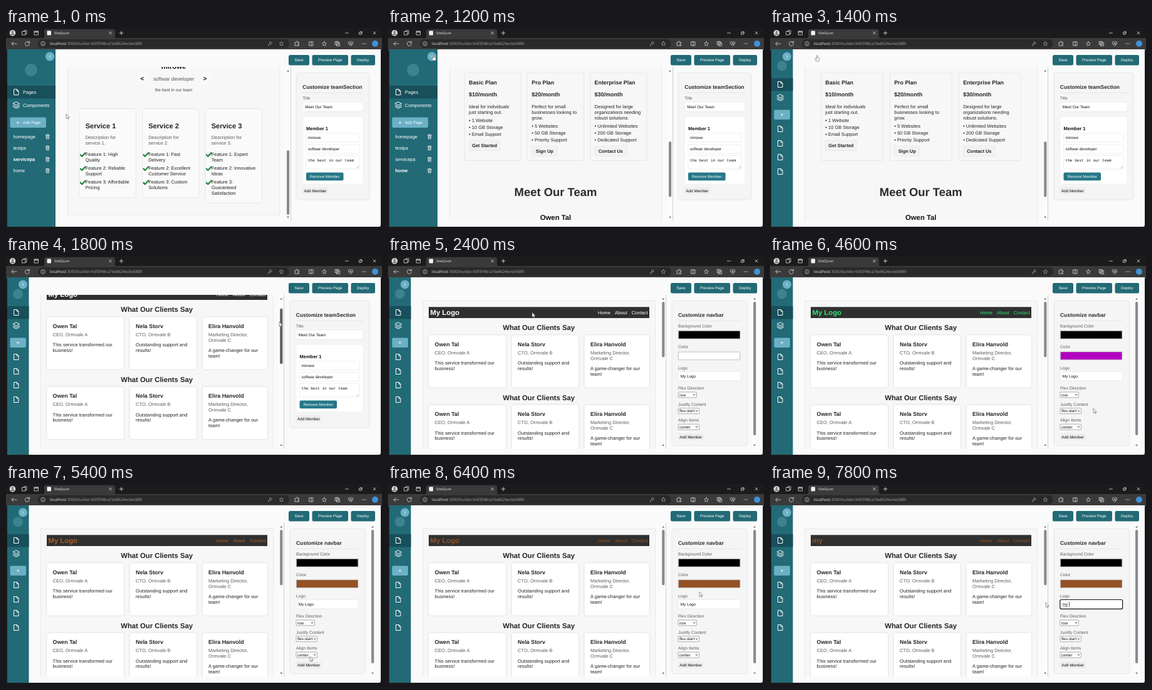
An HTML page that plays this animation: 600 px wide and 319 px high, repeating every 8 s.

```html
<!DOCTYPE html>
<html lang="en">
<head>
<meta charset="utf-8">
<title>Page builder</title>
<style>
html, body { margin: 0; width: 100%; height: 100%; overflow: hidden; background: #1b1b1b; }
svg { display: block; width: 100vw; height: 100vh; }
text { font-family: "Liberation Sans", Arial, sans-serif; white-space: pre; text-rendering: geometricPrecision; }
.ui { font-family: "Open Sans", sans-serif; }
.mono { font-family: "Liberation Mono", monospace; }
.soft { filter: drop-shadow(0 .8px 1.3px rgba(0,0,0,.18)); }
</style>
</head>
<body>
<svg id="stage" viewBox="0 0 600 319"></svg>
<script>
const LOOP = 8000, STEP = 200;
const INK = '#242424', GREY = '#5c5c5c', TEAL = '#226a76', PALE = '#6cb0c5', PAGE = '#f7f7f8';
const BOSS = 'Owen Tal', MEMBER = 'mirowe';
const stage = document.getElementById('stage');

// y is the vertical middle of the line
function text(x, y, s, size = 7.53, fill = INK, more = '') {
  const safe = s.replace(/&/g, '&amp;').replace(/</g, '&lt;');
  return `<text x="${x}" y="${y + size * 0.35}" font-size="${size}" fill="${fill}" ${more}>${safe}</text>`;
}
const bold = (x, y, s, size, fill, more = '') => text(x, y, s, size, fill, 'font-weight="700" ' + more);
const mid = 'text-anchor="middle"';
const lines = (x, y, list, gap, size, fill) => list.map((s, i) => text(x, y + i * gap, s, size, fill)).join('');
const rect = (x, y, w, h, fill, r = 0, more = '') =>
  `<rect x="${x}" y="${y}" width="${w}" height="${h}" rx="${r}" fill="${fill}" ${more}/>`;
const circle = (x, y, r, fill, more = '') => `<circle cx="${x}" cy="${y}" r="${r}" fill="${fill}" ${more}/>`;
const line = (x, y, d, color, w = 0.8) =>
  `<path transform="translate(${x} ${y})" d="${d}" fill="none" stroke="${color}" stroke-width="${w}" stroke-linecap="round" stroke-linejoin="round"/>`;
const edge = (c, w = 0.6) => `stroke="${c}" stroke-width="${w}"`;

// keys: [ms, value...], linear between them
function track(keys, t) {
  let i = 0;
  while (i < keys.length - 1 && keys[i + 1][0] <= t) i++;
  const a = keys[i], b = keys[i + 1];
  if (!b) return a.slice(1);
  const k = Math.max(0, (t - a[0]) / (b[0] - a[0]));
  return a.slice(1).map((v, j) => v + (b[j + 1] - v) * k);
}
// keys: [ms, value], held until the next one
const hold = (keys, t) => keys.filter(k => k[0] <= t).pop()[1];

const POINTER = [[0, 96, 137], [200, 84, 160], [600, 22, 225], [800, 34, 175], [1200, 73, 43], [1400, 75, 44],
  [1600, 437, 150], [1800, 436, 105], [2000, 436, 93], [2400, 230, 90], [2800, 505, 156], [3000, 500, 205],
  [3200, 528, 274], [3400, 551, 183], [3600, 545, 200], [4000, 500, 265], [4400, 524, 262], [4600, 516, 243],
  [5000, 530, 270], [5400, 485, 275], [5800, 512, 236], [6000, 515, 245], [6400, 497, 172], [6600, 488, 190],
  [7600, 488, 190], [7800, 440, 189]];
const SCROLL = [[0, 292], [1400, 292], [1600, 150], [1800, 29], [2000, 0]];
const LOGO_INK = [[0, '#ffffff'], [3000, '#d8a0a8'], [3200, '#c85060'], [3400, '#bd2a3a'], [3600, '#b300c0'],
  [4000, '#4a4fe0'], [4200, '#22b0d0'], [4400, '#22d890'], [4600, '#2ee577'], [5000, '#a5c83a'],
  [5200, '#d09a30'], [5400, '#a86028'], [5800, '#955224']];
const SWATCH = [[0, '#ffffff'], [3000, '#d8a0a8'], [3200, '#c85060'], [3400, '#b3283f'], [3600, '#b300c0'],
  [5200, '#b07830'], [5400, '#955224']];
const LOGO_TEXT = [[0, 'My Logo'], [6800, ''], [7000, 'm'], [7200, 'my']];

const FILE = 'M-3.5-4.5H.8L3.5-1.8V4.5H-3.5ZM.8-4.5V-1.8H3.5';
const LAYERS = 'M0-5L5-2.4 0 .2-5-2.4ZM-5 .2L0 2.8 5 .2M-5 2.6L0 5.2 5 2.6';
const TRASH = 'M-3-2.3H3M-1.2-2.3V-3.4H1.2V-2.3M-2.3-2.3L-2 3.4H2L2.3-2.3M-.7-.6V1.8M.7-.6V1.8';
const STAR = 'M0-3.4L1-1.1 3.4-.9 1.6.8 2.1 3.2 0 1.9-2.1 3.2-1.6.8-3.4-.9-1-1.1Z';
const CROSS = 'M-2-2L2 2M2-2L-2 2', PLUS = 'M-2.8 0H2.8M0-2.8V2.8', BOX = 'M-3-3H3V3H-3Z';

function browser() {
  const c = '#dcdcdc', dim = '#a8a8a8';
  return rect(0, 0, 600, 319, '#1b1b1b') + rect(0, 16, 600, 20, '#3a3a3a')
    + '<path d="M58 17Q61 17 61 13V5Q61 2 64 2H171Q174 2 174 5V13Q174 17 177 17Z" fill="#3a3a3a"/>'
    + circle(10.5, 8, 4.8, '#d8d8d8') + circle(10.5, 6.5, 1.7, '#777') + '<path d="M7.4 11.3a3.1 2.8 0 0 1 6.2 0Z" fill="#777"/>'
    + line(29.5, 8, 'M-3.5-2.5H1.5V3H-3.5ZM-1-2.5V-4H3.5V1.5H1.5', c) + line(48.5, 8, BOX + 'M-3-1.2H3M-3-2.2H3', c)
    + rect(65.5, 4.5, 6.5, 7, '#f1f1f1', 1) + text(77, 8, 'SiteQuon', 5.6, '#eee', 'class="ui"')
    + line(166.5, 8, CROSS, c) + line(184, 8, PLUS, c, 0.9)
    + line(544, 8, 'M-2.5 0H2.5', c) + line(566, 8, 'M-2.2-1H1V2.2H-2.2ZM-1-2.2H2.2V1', c) + line(588, 8, CROSS, c)
    + rect(51, 18, 401, 14, '#292929', 7)
    + line(13, 25, 'M4 0H-4M-1-3L-4 0-1 3', c) + line(34, 25, 'M3-1.8A3.5 3.5 0 1 0 3.5.6M3.4-4V-1.4H.8', c)
    + circle(59, 25, 3.4, 'none', edge(c, 0.7)) + line(59, 25, 'M0-.3V1.8M0-1.6V-1.5', c)
    + text(70, 25, 'localhost', 6.2, '#f0f0f0', 'class="ui"')
    + text(96, 25, ':3000/builder/66f3f48ca76e8624ec6e5889', 6.2, dim, 'class="ui"')
    + line(421, 25, 'M0 0L-3 3M-2 2L-1 3M0 0A1.8 1.8 0 1 1 2.5 .2 1.8 1.8 0 0 1 0 0', dim) + line(439.5, 25, STAR, dim, 0.7)
    + line(464.5, 25, 'M-3-2H-1A1.2 1.2 0 1 1 1-2H3V0A1.2 1.2 0 1 0 3 1.8V3.2H-3Z', c)
    + line(487, 25, BOX + 'M0-3V3', c) + line(508, 25, STAR, c, 0.7)
    + line(529, 25, 'M-3.5-3.5H1.5V1.5H-3.5ZM1.5-1.5H3.5V3.5H-1.5V1.5M-1-2.5V.5M-2.5-1H.5', c)
    + line(550, 25, 'M0 3.5L-3.4 0A2 2 0 0 1 0-2.4 2 2 0 0 1 3.4 0ZM-2 0H-.7L0-1.2.8 1.2 1.2 0H2.2', c)
    + [-2.5, 0, 2.5].map(d => circle(571 + d, 25, 0.7, c)).join('') + circle(589, 25, 5, '#3f93d6')
    + '<path d="M2 34H598V314Q598 317 595 317H5Q2 317 2 314Z" fill="#fafafb"/>';
}

function sidebar(open, home) {
  const w = open ? 77 : 34.5, white = '#fff';
  let s = `<path d="M2 34H${2 + w}V317H5Q2 317 2 314Z" fill="${TEAL}"/>`;
  if (!open) {
    s += circle(19, 60.5, 8, '#3b838f') + circle(27, 45.5, 7, PALE) + line(27, 45.5, 'M-1-2L1 0-1 2', white)
      + rect(2, 80, 34.5, 20.5, '#174f5a') + line(16.5, 90, FILE, white, 1) + line(16.5, 111, LAYERS, white, 1)
      + rect(6.5, 130.5, 25.5, 15.5, PALE, 2) + line(19, 138.3, 'M-1.7 0H1.7M0-1.7V1.7', white);
    return s + [161, 184, 206, 229].map(y => line(16.5, y, FILE, white, 1)).join('');
  }
  s += circle(40, 67, 10, '#3b838f') + circle(70, 45.5, 7.2, PALE) + line(70, 45.5, 'M1-2L-1 0 1 2', white)
    + rect(2, 92, 77, 20.5, '#174f5a') + line(16.5, 102.3, FILE, white, 1) + text(27, 102.5, 'Pages', 7.53, white)
    + line(16.5, 123, LAYERS, white, 1) + text(27, 123, 'Components', 7.53, white)
    + rect(6.5, 142.5, 57.5, 16.5, PALE, 2) + line(19, 151, 'M-1.7 0H1.7M0-1.7V1.7', white) + text(27, 151, 'Add Page', 6.4, white);
  ['homepage', 'testpa', 'servicepa', 'home'].forEach((name, i) => {
    const y = 173 + i * 18.1;
    s += (i === (home ? 3 : 2) ? bold : text)(11.5, y, name, 7.53, white) + line(66.3, y + 0.3, TRASH, white, 0.75);
  });
  return s;
}

function topButtons() {
  return [[451, 33, 'Save'], [488.5, 57.5, 'Preview Page'], [550.5, 38.5, 'Deploy']].map(([x, w, s]) =>
    rect(x, 43, w, 16.5, TEAL, 2.5) + text(x + w / 2, 51.3, s, 6.25, '#fff', mid)).join('');
}

function check(x, y) {
  const d = 'M-3.8.4L-1.4 2.9 3.8-2.7';
  return line(x, y, d, '#123c1c', 2.1) + line(x, y, d, '#27b24a', 1.2);
}

function servicePage() {
  const items = [
    ['High', 'Quality', 'Reliable', 'Support', 'Affordable', 'Pricing'],
    ['Fast', 'Delivery', 'Excellent', 'Customer Service', 'Custom', 'Solutions'],
    ['Expert', 'Team', 'Innovative', 'Ideas', '', 'Guaranteed', 'Satisfaction']];
  let s = rect(98.3, 40, 338.5, 258, PAGE, 0, edge('#dedede'))
    + bold(267.5, 61.5, MEMBER, 11.3, '#111', mid) + text(267.5, 81.5, 'softwar developer', 8.25, '#555', mid)
    + text(267.5, 98.3, 'the best in our team', 6.75, '#444', mid);
  [[217.5, '<'], [317.5, '>']].forEach(([x, c]) => {
    s += circle(x, 80, 9.5, '#fcfcfc', 'opacity=".8"') + bold(x, 80, c, 10, '#111', mid);
  });
  items.forEach((f, i) => {
    const x = 117 + i * 100.5;
    s += rect(x, 128.5, 90.3, i > 1 ? 150.5 : 142, '#fafafb', 4, edge('#dcdcdc'))
      + bold(x + 9.7, 156, 'Service ' + (i + 1), 11.1) + lines(x + 9.7, 174, ['Description for', `service ${i + 1}.`], 9, 7.53, GREY);
    for (let n = 0; n < 3; n++) {
      const y = 201.3 + n * 22.2, rest = n < 2 ? [f[n * 2 + 1]] : f.slice(5);
      s += check(x + 5.7, y + 0.6) + lines(x + 9.7, y, [`Feature ${n + 1}: ${f[n * 2]}`, ...rest], 8.9);
    }
  });
  return s;
}

function clients(y) {
  const cards = [
    [65, 123, BOSS, ['CEO, Ormvale A'], ['This service transformed our', 'business!']],
    [197.5, 106.5, 'Nela Storv', ['CTO, Ormvale B'], ['Outstanding support and', 'results!']],
    [313.5, 103.5, 'Elira Hanvold', ['Marketing Director,', 'Ormvale C'], ['A game-changer for our', 'team!']]];
  return bold(240.7, y, 'What Our Clients Say', 11.3, INK, mid) + cards.map(([x, w, name, role, quote]) =>
    rect(x, y + 11.7, w, 83.5, '#fff', 4, 'class="soft"') + bold(x + 9.6, y + 26, name, 8.85)
    + lines(x + 9.6, y + 40, role, 8.5, 7.53, GREY) + lines(x + 9.6, y + 47.5 + role.length * 8.7, quote, 8.5)).join('');
}

function pricing(x0, w) {
  const X = u => x0 + (u - 98.3) * w / 338.5;
  const plans = [
    ['Basic', 10, ['Ideal for individuals', 'just starting out.'], ['1 Website', '10 GB Storage', 'Email Support'], 'Get Started', 50],
    ['Pro', 20, ['Perfect for small', 'businesses looking to', 'grow.'], ['5 Websites', '50 GB Storage', 'Priority Support'], 'Sign Up', 41],
    ['Enterprise', 30, ['Designed for large', 'organizations needing', 'robust solutions.'], ['Unlimited Websites', '200 GB Storage', 'Dedicated Support'], 'Contact Us', 51.5]];
  return plans.map(([name, price, about, list, label, bw], i) => {
    const x = X(122 + i * 100.3), tx = x + 7, y = 421 + about.length * 9;
    return rect(x, 364, 90.3 * w / 338.5, 139.5, PAGE, 2, edge('#dcdcdc'))
      + bold(tx, 379.3, name + ' Plan', 8.85) + bold(tx, 398.3, `$${price}/month`, 9) + lines(tx, 417, about, 9)
      + lines(tx, y, list.map(s => '• ' + s), 11.1)
      + rect(tx, y + 32, bw, 16.5, '#f2f2f3', 2, edge('#e2e2e2')) + bold(tx + bw / 2, y + 40.3, label, 7.45, INK, mid);
  }).join('') + bold(X(267.5), 553.5, 'Meet Our Team', 18.45, '#2c2c2c', mid) + bold(X(267.5), 593.8, BOSS, 11.3, '#111', mid);
}

function homePage(t, open, scroll) {
  const x = open ? 98.3 : 55.3, w = open ? 338.5 : 371, ink = hold(LOGO_INK, t);
  let s = rect(x, 71.5, w, 640, PAGE, 0, edge('#dedede'));
  if (!open) {
    s += rect(65, 81.3, 352, 17.7, '#303030') + bold(67.5, 90, hold(LOGO_TEXT, t), 11.3, ink)
      + [[335, 'Home'], [362, 'About'], [388.7, 'Contact']].map(([lx, c]) => text(lx, 90.1, c, 7.53, ink)).join('')
      + clients(114.5) + clients(225.8);
  }
  return `<g transform="translate(0 ${-scroll})">${s}${pricing(x, w)}</g>`;
}

function scrollbar(x, y, h, fill) {
  return rect(x - 4, 62, 8, 245, '#fcfcfc')
    + `<path d="M${x - 2} 69.5h4l-2-2.8ZM${x - 2} 300.8h4l-2 2.8Z" fill="#777"/>` + rect(x - 2, y, 4.2, h, fill, 2.1);
}

const field = (x, y, w, h, s, tx = x + 4) =>
  rect(x, y, w, h, '#fff', 2, edge('#e3e3e3')) + text(tx, y + h / 2 + 0.1, s, 6.35, '#111');
const addButton = (x, y) => rect(x, y, 41.5, 11, '#eeeeef', 2) + text(x + 20.7, y + 5.5, 'Add Member', 6.27, '#111', mid);
const panelBox = (x, w, h) => rect(x, 72, w, h, '#f5f5f6', 4, 'class="soft"');
const title = (x, w, s) => bold(x, 94, s, 8.45, '#2a2a2a') + rect(x, 103, w, 0.6, '#dddde0');

function teamPanel(x) {
  const w = 570 - x, ix = x + 5.7, iw = 564 - ix;
  return panelBox(x - 9.5, w + 19, 201.5) + title(x, w, 'Customize teamSection')
    + text(x, 111.8, 'Title', 6.6, GREY) + field(x, 118, w, 15, 'Meet Our Team')
    + rect(x, 141, w, 108, '#fff', 3, edge('#e8e8e8')) + bold(ix, 160.3, 'Member 1', 7.5, '#111')
    + field(ix, 168, iw, 14, MEMBER, ix + 3) + field(ix, 186, iw, 14, 'softwar developer', ix + 3)
    + field(ix, 203.5, iw, 21.5, '') + text(ix + 3, 210.7, 'the best in our team', 6.1, '#111', 'class="mono"')
    + line(561, 222, 'M-1.5 1.5L1.5-1.5M.5 1.5L1.5.5', '#888', 0.5)
    + rect(ix, 230.5, 59.5, 12.8, '#257787', 2) + text(ix + 29.8, 237, 'Remove Member', 6.2, '#fff', mid)
    + addButton(x - 0.5, 254);
}

function select(y, w, s) {
  return rect(463, y, w, 8.8, '#fff', 1, edge('#777')) + text(465, y + 4.4, s, 6.3, '#111')
    + line(463 + w - 4, y + 4.4, 'M-1.4-.7L0 .7 1.4-.7', '#111', 0.9);
}
const swatch = (y, c) => rect(463, y, 99.3, 13.6, '#efefef', 1, edge('#d5d5d5')) + rect(463.8, y + 0.8, 97.7, 12, c, 0, edge('#777', 0.3));

function navPanel(t) {
  const focus = t >= 6600, s = hold(LOGO_TEXT, t);
  const labels = [[111.8, 'Background Color'], [145, 'Color'], [178.3, 'Logo'], [210.8, 'Flex Direction'], [236.8, 'Justify Content'], [262, 'Align Items']];
  let out = panelBox(453.5, 119.5, 230) + title(463, 99.5, 'Customize navbar')
    + labels.map(([y, c]) => text(463, y, c, 6.75, GREY)).join('')
    + swatch(119, '#000') + swatch(152.3, hold(SWATCH, t)) + field(463, 184.5, 99.3, 14.5, s, 466.7);
  if (focus) {
    out += rect(462.8, 184.5, 99.8, 14.8, 'none', 2, edge('#151515', 1.2));
    const end = 467 + [0, 5.3, 8.6][Math.min(s.length, 2)];
    if (s.length < 3) out += rect(end + 1.4, 188, 0.7, 7.5, '#111');
    if (s === 'my') out += rect(467, 195.4, 8.5, 0.6, '#555');
  }
  return out + select(217, 29.5, 'row') + select(242.8, 33.5, 'flex-start') + select(268.2, 33.5, 'center') + addButton(462.5, 283);
}

function pointer(t) {
  const [x, y] = track(POINTER, t);
  const hand = (t >= 600 && t < 800) || t === 1200 || t === 1400;
  const d = hand ? 'M-.8 0Q0-1 .8 0V3.2L3.6 4V7L2.8 9H-1.2L-3.4 5.4-2.6 4.6-.8 6Z' : 'M0 0V7.4L1.8 5.9 3 8.5 4.1 8 3 5.5H5.2Z';
  return `<path transform="translate(${x} ${y})" d="${d}" fill="#fff" ${edge('#555')}/>`;
}

function scene(t) {
  const home = t >= 600, open = t < 1400, nav = t >= 2400;
  const scroll = track(SCROLL, t)[0], bar = open ? 450 : 439.2;
  const drag = t >= 1600 && t <= 2000;
  return '<defs><clipPath id="view"><rect x="40" y="62" width="405" height="245.5"/></clipPath></defs>'
    + browser() + sidebar(open, home) + topButtons()
    + `<g clip-path="url(#view)">${home ? homePage(t, open, scroll) : servicePage()}</g>`
    + scrollbar(bar, home ? 73 + scroll * 0.37 : 195, home ? 88.5 : 103, drag ? '#606060' : '#8b8b8b')
    + rect(bar + 4, 62, 0.8, 245.5, '#c4c4c6')
    + (nav ? navPanel(t) + scrollbar(585, 73, 213, '#8b8b8b') : teamPanel(open ? 473.3 : 462.8))
    + pointer(t);
}

let shown = -1;
function tick(now) {
  const t = Math.floor(now % LOOP / STEP) * STEP;
  if (t !== shown) stage.innerHTML = scene(shown = t);
  requestAnimationFrame(tick);
}
tick(performance.now());
</script>
</body>
</html>
```
